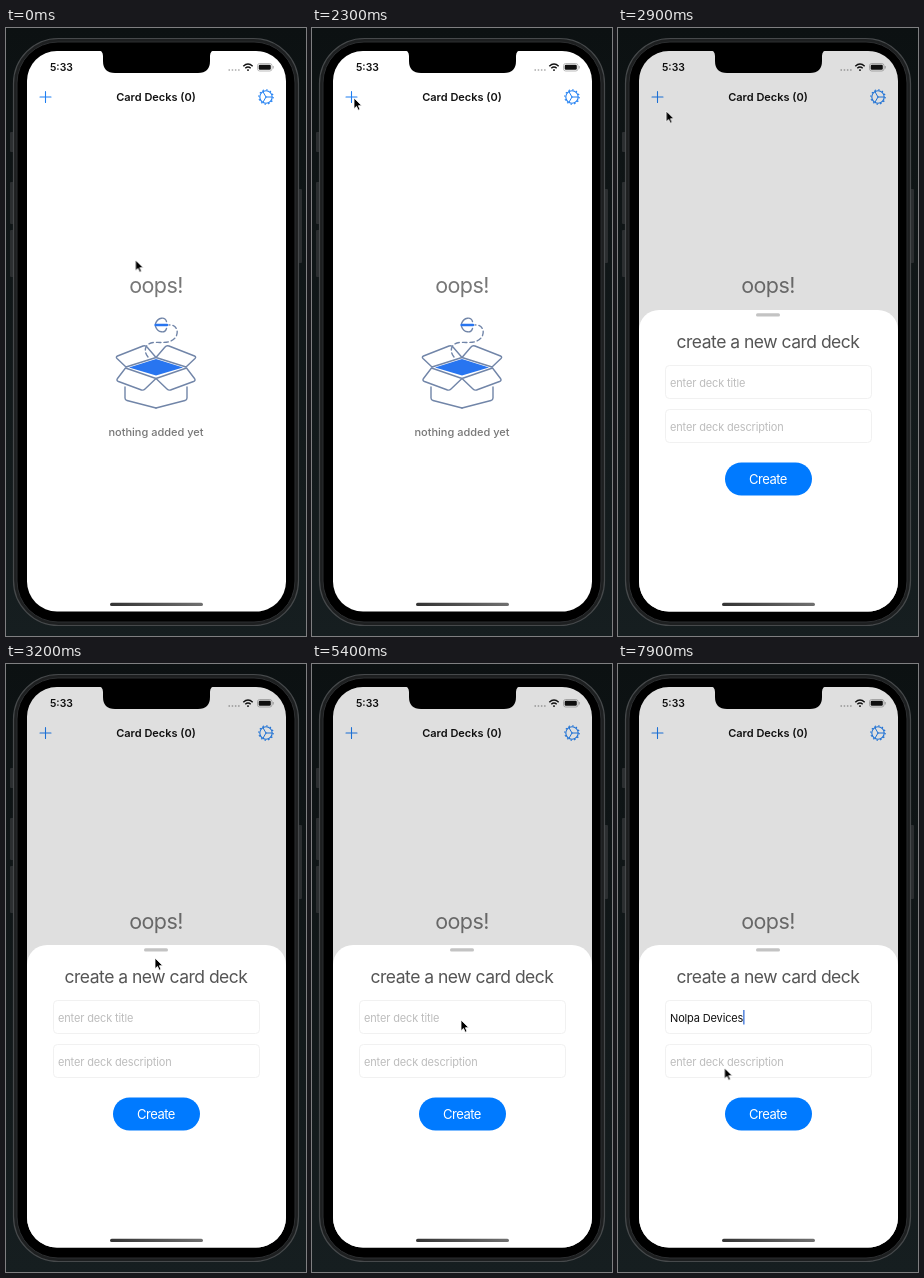
Animation of 300 by 608 pixels, one loop 8000 ms. Source, as an HTML page:

```html
<!DOCTYPE html>
<html lang="en">
<head>
<meta charset="utf-8">
<title>Card decks</title>
<style>
  html, body { margin: 0; width: 100%; height: 100%; overflow: hidden; background: #11181a; }
  body { background: linear-gradient(#0c1112, #161e20); }
  svg { display: block; width: 300px; height: 608px; }
  text { font-family: Inter, Roboto, sans-serif; font-optical-sizing: none; }
  .mid { text-anchor: middle; }
  .semi { font-weight: 600; fill: #111; }
  .oops { font-size: 21.5px; letter-spacing: -.6px; fill: #777; }
  .note { font-size: 11px; font-weight: 500; fill: #777; }
  .heading { font-size: 17.5px; letter-spacing: -.5px; fill: #555; }
  .input { font-size: 11px; letter-spacing: -.15px; fill: #111; }
  .hint { fill: #bdbdbd; }
  .create { font-size: 13px; letter-spacing: -.5px; fill: #fff; }
  .field { fill: #fff; stroke: #f1f1f1; }
  .icon { fill: none; stroke: #1f7ff2; stroke-width: 1.1; stroke-linecap: round; }
  .sketch { fill: none; stroke: #7185a8; stroke-width: 1.4; stroke-linejoin: round; stroke-linecap: round; }

  #sheet { animation: rise 8s infinite; }
  #dim { animation: dim 8s infinite; }
  #pointer { animation: point 8s infinite ease-in-out; }

  @keyframes rise {
    0% { transform: translateY(304px); }
    33.4% { transform: translateY(304px); animation-timing-function: cubic-bezier(0, 0, .2, 1); }
    36.5%, 100% { transform: none; }
  }
  @keyframes dim {
    0% { opacity: 0; }
    33.4% { opacity: 0; animation-timing-function: cubic-bezier(0, 0, .2, 1); }
    35.1%, 100% { opacity: .125; }
  }
  @keyframes point {
    0%, 5% { transform: translate(129.5px, 232px); }
    13.75%, 16% { transform: translate(113.3px, 172px); }
    27%, 35.5% { transform: translate(42px, 70px); }
    40%, 45% { transform: translate(149px, 294px); }
    52%, 91.5% { transform: translate(149px, 356px); }
    98%, 100% { transform: translate(106.5px, 404px); }
  }
</style>
</head>
<body>
<svg viewBox="0 0 300 608">
  <defs>
    <clipPath id="screen"><rect x="21" y="23" width="259" height="560.5" rx="30"/></clipPath>
    <linearGradient id="bar"><stop stop-color="#333"/><stop offset="1" stop-color="#707070"/></linearGradient>
    <g id="flaps">
      <path d="M120 339L111 330.500Q109.500 329 111.500 328L137 318Q139.500 317 141 319L150 329.500Z"/>
      <path d="M119.500 340L150 350.500L139 361Q137.500 362.500 135.500 362L112.500 353.500Q110 352.500 111.500 350.500Z"/>
      <path d="M119 359V370Q119 372 121 372.500L150 380"/>
    </g>
  </defs>

  <!-- phone body -->
  <g fill="#2b2e30">
    <rect x="4" y="104" width="4" height="20" rx="1"/>
    <rect x="4" y="154" width="4" height="42" rx="1"/>
    <rect x="4" y="202" width="4" height="47" rx="1"/>
    <rect x="292" y="161" width="4" height="74" rx="1"/>
  </g>
  <rect x="7.500" y="10.500" width="285" height="587" rx="45" fill="#1d1f20" stroke="#46494b" stroke-width="1.200"/>
  <rect x="11" y="14" width="278" height="580" rx="41" fill="#000" stroke="#2c2e30"/>

  <g clip-path="url(#screen)">
    <rect x="20" y="22" width="262" height="563" fill="#fff"/>

    <!-- status bar -->
    <text class="semi" x="44" y="43.300" font-size="10.400">5:33</text>
    <path d="M222.500 42H234" stroke="#aaa" stroke-width="1.500" stroke-dasharray="1.500 1.700"/>
    <g fill="none" stroke="#111" stroke-width="1.500">
      <path d="M237.300 38.200Q242 33.800 246.700 38.200M239.300 40.300Q242 37.800 244.700 40.300"/>
      <path d="M242 41.300V43"/>
    </g>
    <rect x="251.500" y="35.500" width="14.500" height="7.500" rx="2.200" fill="none" stroke="#aaa" stroke-width=".8"/>
    <rect x="252.700" y="36.700" width="12.100" height="5.100" rx="1.200" fill="#111"/>
    <path d="M267.200 38V40.500" stroke="#aaa"/>

    <!-- title bar -->
    <path class="icon" d="M34 69H45M39.500 63.500V74.500"/>
    <text class="semi mid" x="150" y="73" font-size="11">Card Decks (0)</text>
    <g class="icon" transform="translate(260 69)">
      <circle r="6.200"/>
      <circle r="7.200" stroke-linecap="butt" stroke-dasharray="1.500 2.270"/>
      <path stroke-width="1" d="M0 0H6M0 0L-3 -5.200M0 0L-3 5.200"/>
    </g>

    <!-- empty state -->
    <text class="oops mid" x="150" y="265">oops!</text>
    <g class="sketch">
      <use href="#flaps"/>
      <use href="#flaps" transform="matrix(-1 0 0 1 300 0)"/>
      <path d="M123 339.500L150 331L177 339.500L150 347.500Z" fill="#2875f0" stroke="none"/>
      <path stroke-dasharray="4.500 3" d="M142 329C137 323 139 315 148 314.500C157 314 163 316 169 310C174 304 170 296 163 297"/>
      <path d="M149.500 295.500C152 289 159 288.500 160.500 293.500M149.500 298.500C152 305 159 305.500 160.500 300.500"/>
      <path d="M149.500 297H161" stroke="#2875f0" stroke-width="2.400"/>
    </g>
    <text class="note mid" x="150" y="407.500">nothing added yet</text>

    <rect id="dim" x="20" y="22" width="262" height="563"/>

    <!-- bottom sheet -->
    <g id="sheet">
      <rect x="21" y="281" width="259" height="330" rx="20" fill="#fff"/>
      <rect x="138" y="284.300" width="24" height="3.200" rx="1.600" fill="#c3c3c3"/>
      <text class="heading mid" x="150" y="318.500">create a new card deck</text>
      <rect class="field" x="47.500" y="336.500" width="206" height="33" rx="4"/>
      <rect class="field" x="47.500" y="380.500" width="206" height="33" rx="4"/>
      <text id="entry" class="input" x="52" y="357.500"></text>
      <rect id="caret" x="52" y="346" width="1.300" height="14.500" fill="#3a72d8"/>
      <text class="input hint" x="52" y="401.500">enter deck description</text>
      <rect x="107" y="433.500" width="87" height="33" rx="16.500" fill="#007aff"/>
      <text class="create mid" x="150" y="454.800">Create</text>
    </g>

    <rect x="104" y="574.700" width="93" height="3.400" rx="1.700" fill="url(#bar)"/>
  </g>

  <path d="M91 22H210Q204 22 204 28V33Q204 45 192 45H109Q97 45 97 33V28Q97 22 91 22Z"/>

  <path id="pointer" d="M0 0V10.700L2.500 8.400L4.200 12.200L6 11.400L4.400 7.700H7.800Z" stroke="#fff" stroke-width=".8" stroke-linejoin="round"/>
</svg>
<script>
  const hint = "enter deck title";
  const words = "Nolpa Devices";
  const tapAt = 4400, typeAt = 5450, keyGap = 140;
  const entry = document.getElementById("entry");
  const caret = document.getElementById("caret");
  const clock = document.getElementById("sheet").getAnimations()[0];

  function draw() {
    const t = (clock.currentTime || 0) % 8000;
    const keys = t < typeAt ? 0 : Math.min(words.length, 1 + Math.floor((t - typeAt) / keyGap));
    entry.textContent = keys ? words.slice(0, keys) : hint;
    entry.classList.toggle("hint", !keys);
    caret.setAttribute("x", 52 + (keys ? entry.getComputedTextLength() : 0));
    const lit = keys > 0 || (t >= tapAt && (t - tapAt) % 1000 < 500);
    caret.style.opacity = lit ? 1 : 0;
    requestAnimationFrame(draw);
  }
  draw();
</script>
</body>
</html>
```
